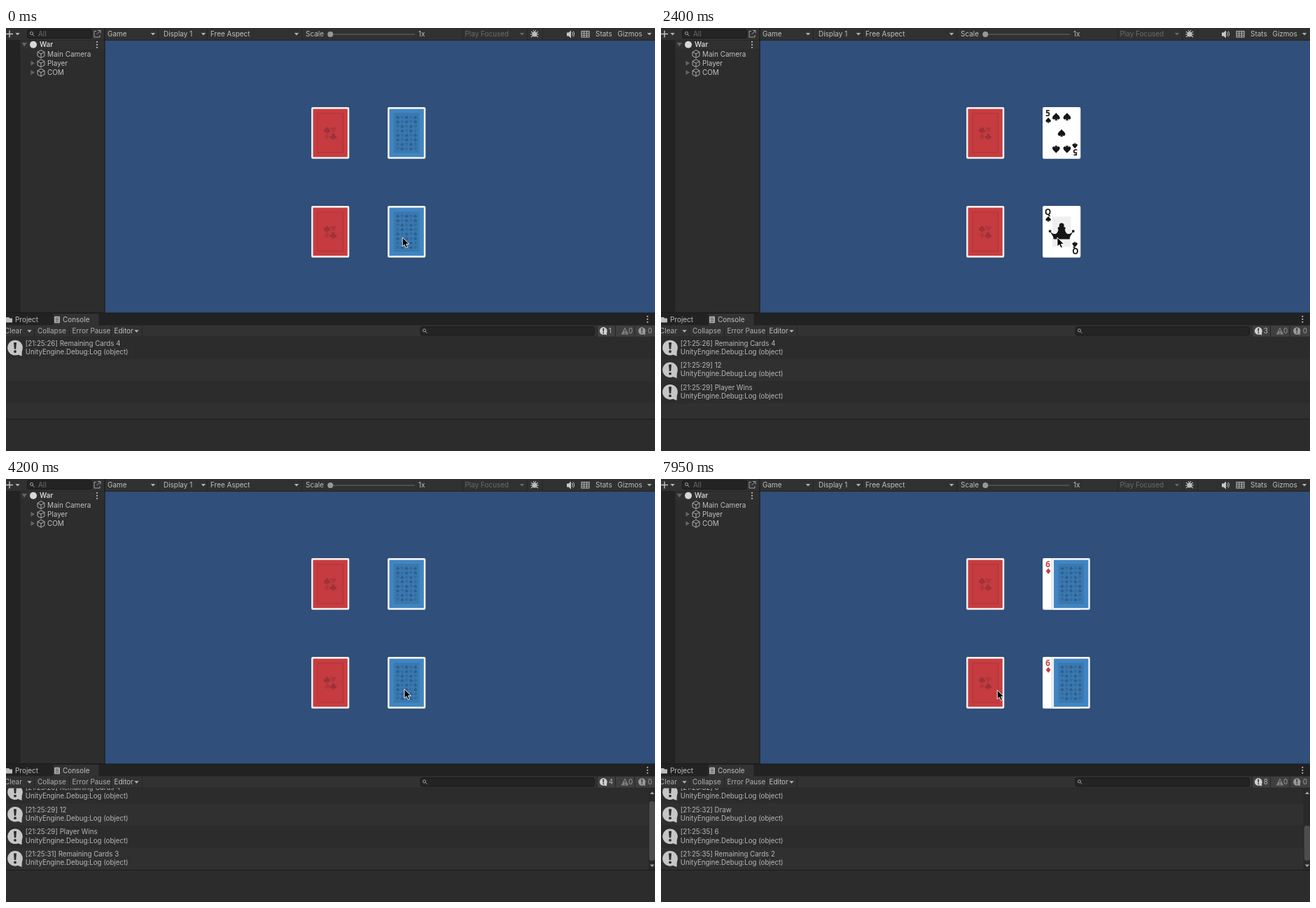
Write an HTML page that moves like this. It is 927 px wide and 604 px high and loops after 8 s.

```html
<!DOCTYPE html>
<html lang="en">
<head>
<meta charset="utf-8">
<title>Card game in an editor</title>
<style>
html, body { margin: 0; width: 100%; height: 100%; overflow: hidden; background: #2c2c2c; }
svg { display: block; width: 927px; height: 604px; }
text { font: 9.95px Inter, "Liberation Sans", sans-serif; fill: #c0c0c0; white-space: pre; }
.log text { font-size: 9.73px; fill: #b8b8b8; }
.rank { font: 700 11.6px "Open Sans", "Noto Sans", sans-serif; text-anchor: middle; }
</style>
</head>
<body>
<svg viewBox="0 0 927 604" xmlns="http://www.w3.org/2000/svg">
  <defs><clipPath id="list"><rect y="441.5" width="927" height="116.5"/></clipPath></defs>
  <g id="chrome"></g>
  <g id="cards"></g>
  <g id="log" class="log" clip-path="url(#list)"></g>
  <g id="counter"></g>
  <path id="cursor" d="M0 0V13L3 10.4L5.2 15L7.5 14L5.4 9.6L9.4 9.3Z" fill="#000" stroke="#fff" stroke-width=".9" stroke-linejoin="round"/>
</svg>
<script>
const LOOP = 8000, ROW = 31.6, LIST_TOP = 441, LIST_HEIGHT = 117;
const RED = '#c83c40', BLACK = '#151515';
const $ = id => document.getElementById(id);

// time, x, y: the pointer jumps from one place to the next
const pointer = [
  [0, 566.2, 299], [150, 569.4, 299], [2400, 566, 299], [2550, 526, 303], [2700, 503, 303.3],
  [2850, 481, 299.6], [3000, 475.2, 299.6], [3600, 525, 299.5], [3750, 539, 299.5], [3900, 548, 299.5],
  [4050, 563, 299.5], [4200, 569, 300], [4350, 569.6, 301.3], [7350, 548, 301.5],
  [7500, 487, 301], [7650, 480.3, 301.3]
];

// time, seconds, message
const messages = [
  [0, 26, 'Remaining Cards 4'], [1200, 29, '12'], [1200, 29, 'Player Wins'],
  [3300, 31, 'Remaining Cards 3'], [4950, 32, '6'], [4950, 32, 'Draw'],
  [7350, 35, '6'], [7950, 35, 'Remaining Cards 2']
];

// time, upper cards, lower cards
const deals = [
  [0, ['back'], ['back']], [1200, ['5'], ['Q']], [3150, ['back'], ['back']],
  [4950, ['6'], ['6']], [7800, ['6', 'back'], ['6', 'back']]
];

const suits = {
  spade: 'M0-5C1-3 5-1 5 2A2.4 2.4 0 0 1 .8 2.8Q1 4.5 2 5H-2Q-1 4.5-.8 2.8A2.4 2.4 0 0 1-5 2C-5-1-1-3 0-5Z',
  heart: 'M0 5C-1.5 2.5-5 0-5-2.3A2.5 2.5 0 0 1 0-2.8A2.5 2.5 0 0 1 5-2.3C5 0 1.5 2.5 0 5Z',
  diamond: 'M0-6L5 0L0 6L-5 0Z',
  club: 'M0-5a2.4 2.4 0 0 1 1.9 3.9A2.4 2.4 0 1 1 .8 2.3Q1 4.5 2 5H-2Q-1 4.5-.8 2.3A2.4 2.4 0 1 1-1.9-1.1A2.4 2.4 0 0 1 0-5Z'
};

const rect = (x, y, w, h, fill, more = '') =>
  `<rect x="${x}" y="${y}" width="${w}" height="${h}" fill="${fill}" ${more}/>`;
const circle = (x, y, r, fill, more = '') => `<circle cx="${x}" cy="${y}" r="${r}" fill="${fill}" ${more}/>`;
const fill = (d, color) => `<path d="${d}" fill="${color}"/>`;
const line = (d, color, width = 1) => `<path d="${d}" fill="none" stroke="${color}" stroke-width="${width}"/>`;
const label = (x, middle, text, style = '') => `<text x="${x}" y="${middle + 3.5}" style="${style}">${text}</text>`;
const caret = (x, y, color = '#b4b4b4') => fill(`M${x - 3.2} ${y - 1.6}h6.4l-3.2 3.6z`, color);
const at = (x, y, content, more = '') => `<g transform="translate(${x} ${y}) ${more}">${content}</g>`;
const pip = (suit, x, y, scale, color, turn = 0) =>
  at(x, y, fill(suits[suit], color), `rotate(${turn}) scale(${scale})`);
const lens = (x, y) => circle(x, y, 2, 'none', 'stroke="#a8a8a8"') + line(`M${x + 1.5} ${y + 1.5}l2.4 2.4`, '#a8a8a8');
const menuDots = (x, y) => [-4, 0, 4].map(d => circle(x, y + d, 1.1, '#bdbdbd')).join('');
const dividers = (xs, y, h) => xs.map(x => rect(x, y, 1, h, '#252525')).join('');

const bubble = (x, y, scale, color, mark) => at(x, y,
  circle(0, -.5, 10.8, color) + fill('M3 9L9.5 11.5L9.8 3z', color) +
  fill('M-2-8h4l-.8 9.5h-2.4z', mark) + circle(0, 5, 1.9, mark), `scale(${scale})`);

const cube = (x, y) => line(`M${x} ${y - 5.4}l5 2.7v5.6l-5 2.7l-5-2.7v-5.6zM${x - 5} ${y - 2.7}l5 2.7l5-2.7M${x} ${y}v5.6`, '#b0b0b0');

function topBar() {
  const dim = 'fill:#6b6b6b';
  const bug = circle(755, 9, 3.6, '#bdbdbd') +
    line('M750 5l10 8M760 5l-10 8M749 9h12M753 3l2 3l2-3', '#bdbdbd', 1.1);
  const speaker = fill('M801 6.5h2.5l3.5-3v11l-3.5-3h-2.5z', '#c8c8c8') +
    line('M808.5 6q2 2.5 0 5M810 4.5q3.2 4 0 8', '#c8c8c8');
  const keys = rect(822, 4.5, 11, 8.5, 'none', 'stroke="#c0c0c0"') +
    line('M822 7.3h11M822 10.2h11M825.7 4.5v8.5M829.4 4.5v8.5', '#c0c0c0', .9);
  return rect(0, 0, 927, 18, '#313131') + rect(0, 17, 927, 1, '#232323') +
    line('M0 8.5h10M5 3.5v10', '#c4c4c4', 1.4) + caret(16.5, 8.5) +
    rect(30.5, 2, 92, 12.5, '#242424', 'rx="2.5" stroke="#1a1a1a"') +
    lens(36.5, 7.5) + label(46, 8.5, 'All', dim) +
    line('M129 4.5h-3v8.5h8v-3M129.5 9l5-5M131 3.5h4v4', '#a0a0a0') +
    label(145, 8.5, 'Game') + caret(210, 8.5) + label(225, 8.5, 'Display 1') + caret(282, 8.5) +
    label(292, 8.5, 'Free Aspect') + caret(415, 8.5) + label(428, 8.5, 'Scale') +
    rect(463, 8.5, 121, 1.2, '#606060') + circle(463.3, 9, 4, '#999') + label(589, 8.5, '1x') +
    label(655.5, 8.5, 'Play Focused', dim) + caret(737, 8.5, '#6b6b6b') + bug + speaker + keys +
    label(842, 8.5, 'Stats') + label(873.5, 8.5, 'Gizmos') + caret(919, 8.5) +
    dividers([217, 287, 422, 652, 744, 766], 1, 16);
}

function hierarchy() {
  const child = (y, name, opens) => cube(50, y) + label(59, y, name) +
    (opens ? fill(`M35.5 ${y - 3.5}v7l5.5-3.5z`, '#656565') : '');
  return rect(0, 18, 141, 388, '#2d2d2d') + rect(0, 18, 20.5, 388, '#232323') +
    rect(20.5, 17.5, 120.5, 12.8, '#303030') + fill('M22.5 21h7.4l-3.7 5.5z', '#656565') +
    circle(39, 23.7, 5, '#d8d8d8') + label(48, 23.7, 'War', 'font-weight:600;fill:#d0d0d0') + menuDots(130, 23.8) +
    child(37, 'Main Camera') + child(50.2, 'Player', true) + child(63.5, 'COM', true) +
    rect(140.5, 0, 1.2, 407, '#1a1a1a');
}

function consolePanel() {
  const soft = 'fill:#b0b0b0', faint = 'fill:#a0a0a0';
  return rect(0, 406, 927, 18.5, '#222') + rect(0, 406.4, 927, .8, '#1a1a1a') +
    rect(67.5, 408, 65, 17, '#323232') +
    fill('M0 413h4l1.5 1.5h3.5v6h-9z', '#bdbdbd') + label(13, 416.5, 'Project') +
    rect(69, 411.8, 8, 9.5, '#b4b4b4', 'rx="1"') + line('M70.5 414.2h5M70.5 416.6h5M70.5 419h5', '#444') +
    label(81, 416.5, 'Console') + menuDots(916.3, 415.8) +
    rect(0, 424.5, 927, 17, '#323232') + rect(0, 440.7, 927, .8, '#222') +
    label(-2, 432.7, 'Clear', soft) + caret(33.5, 432.8) + label(45, 432.7, 'Collapse', soft) +
    label(94.5, 432.7, 'Error Pause', soft) + label(154.5, 432.7, 'Editor') + caret(186.5, 432.8) +
    rect(592, 426.7, 248.5, 12.2, '#242424', 'rx="2.5" stroke="#1a1a1a"') + lens(597.5, 431.8) +
    rect(845, 425, 82, 15.7, '#3f3f3f') +
    dividers([40, 90, 150, 194, 844, 870, 897.5], 425, 16) +
    fill('M884 427.3l5.3 10.2h-10.6z', '#808080') + fill('M883.3 430.5h1.5l-.3 3.5h-.9zM883.3 435h1.5v1.4h-1.5z', '#333') +
    label(888.9, 432.7, '0', faint) + bubble(908.3, 432.7, .48, '#999', '#333') + label(916.8, 432.7, '0', faint) +
    rect(0, 558, 927, 46, '#2c2c2c') + rect(0, 558, 927, 1, '#1c1c1c');
}

const frame = (color, edge) => rect(-27.1, -36.9, 54.2, 73.8, edge, 'rx="2"') +
  rect(-24.6, -34.3, 49.2, 68.6, color);

const redBack = () => frame(RED, '#f5f1ec') +
  rect(-18.2, -28, 36.4, 56, '#c53b40', 'stroke="#a8363b" stroke-width=".9"') +
  pip('spade', -4.7, -4.3, .92, '#9c323a') + pip('heart', 4.2, -4.3, .8, '#b0373c') +
  pip('diamond', -4.7, 5, .72, '#b0373c') + pip('club', 4.2, 5, .9, '#9c323a');

function blueBack() {
  const order = ['spade', 'heart', 'club', 'diamond'];
  let out = frame('#4085c1', '#f4f6f7') + rect(-18.3, -28.7, 36.6, 57.4, '#3a79b0');
  for (let row = 0; row < 8; row++)
    for (let col = 0; col < 5; col++) {
      const suit = order[(row * 2 + col + (row >> 1)) % 4];
      const dark = suit === 'spade' || suit === 'club';
      out += pip(suit, (col - 2) * 6.3, (row - 3.5) * 6.4, .48, dark ? '#2e5d90' : '#346c9f');
    }
  return out;
}

const crown = rect(-13.3, -21.6, 26.6, 43.2, '#efefef') +
  fill('M-11.5 10.5L-12 7L-17-1Q-12 4-8.5 3Q-5 1.5-4-6H4Q5 1.5 8.5 3Q12 4 17-1L12 7L11.5 10.5Z', BLACK) +
  [[-16.6, -.8, 1.9], [16.6, -.8, 1.9], [-3.3, -4.8, 2.2], [3.3, -4.8, 2.2], [0, -9, 3.5]].map(b => circle(...b, BLACK)).join('');

function face(rank) {
  const red = rank === '6', suit = red ? 'diamond' : 'spade', color = red ? RED : BLACK;
  const corner = `<text class="rank" x="-19.6" y="-23.6" style="fill:${color}">${rank}</text>` +
    pip(suit, -19, -18.3, red ? .68 : .76, color);
  const spots = [];
  if (rank !== 'Q') for (const x of [-7.8, 7.8]) spots.push([x, -23.4], [x, 23.4]);
  if (rank === '5') spots.push([0, 0]);
  if (rank === '6') spots.push([-7.8, 0], [7.8, 0]);
  return frame('#fff', '#fff') + corner + at(0, 0, corner, 'rotate(180)') +
    (rank === 'Q' ? crown : spots.map(([x, y]) => pip(suit, x, y, red ? 1 : 1.08, color, y > 0 ? 180 : 0)).join(''));
}

// a card laid over another leaves a thin shadow at its left edge
const pile = (cards, y) => cards.map((card, i) => at(572.2 + i * 13.5, y,
  (i ? rect(-27.8, -36.4, 1, 72.8, '#c4c8cc') : '') + (card === 'back' ? blueBack() : face(card)))).join('');

const table = ([, upper, lower]) => at(463.2, 149.9, redBack()) + at(463.2, 290.9, redBack()) +
  pile(upper, 149.9) + pile(lower, 290.9);

function logList(shown) {
  const total = shown.length * ROW, scroll = Math.max(0, total - LIST_HEIGHT);
  let out = rect(0, LIST_TOP, 927, LIST_HEIGHT, '#2c2c2c');
  for (let i = 0; i < Math.max(4, shown.length); i++) {
    const y = LIST_TOP + i * ROW - scroll;
    if (i % 2) out += rect(0, y, 927, ROW, '#303030');
    if (!shown[i]) continue;
    const [, seconds, text] = shown[i];
    out += bubble(13, y + 16, 1, '#c6c6c6', '#2b2b2b') +
      label(27.7, y + 9.1, `[21:25:${seconds}] ${text}`) +
      label(27.7, y + 21.3, 'UnityEngine.Debug:Log (object)');
  }
  if (scroll) {
    const thumb = 15 + 75.6 * LIST_HEIGHT / total;
    out += rect(917.5, LIST_TOP, 9.5, LIST_HEIGHT, '#292929') +
      rect(918.7, 545 - thumb, 8.3, thumb, '#4d4d4d', 'rx="3.5"') +
      fill('M920 450h6l-3-3.6z', '#a8a8a8') + caret(923, 552, '#a8a8a8');
  }
  return out;
}

const latest = (steps, t) => steps.filter(step => step[0] <= t).pop();

let deal, count;
function render(t) {
  const nextDeal = latest(deals, t);
  if (nextDeal !== deal) {
    deal = nextDeal;
    $('cards').innerHTML = table(deal);
  }
  const shown = messages.filter(m => m[0] <= t);
  if (shown.length !== count) {
    count = shown.length;
    $('log').innerHTML = logList(shown);
    $('counter').innerHTML = bubble(853.3, 432.7, .5, '#d0d0d0', '#333') + label(860.8, 432.7, count, 'fill:#b4b4b4');
  }
  const [, x, y] = latest(pointer, t);
  $('cursor').setAttribute('transform', `translate(${x} ${y})`);
}

$('chrome').innerHTML = topBar() + hierarchy() + consolePanel() + rect(141.7, 18, 785.3, 388.4, '#304f7a');

let start;
function tick(now) {
  start ??= now;
  render((now - start) % LOOP);
  requestAnimationFrame(tick);
}
render(0);
requestAnimationFrame(tick);
</script>
</body>
</html>
```
